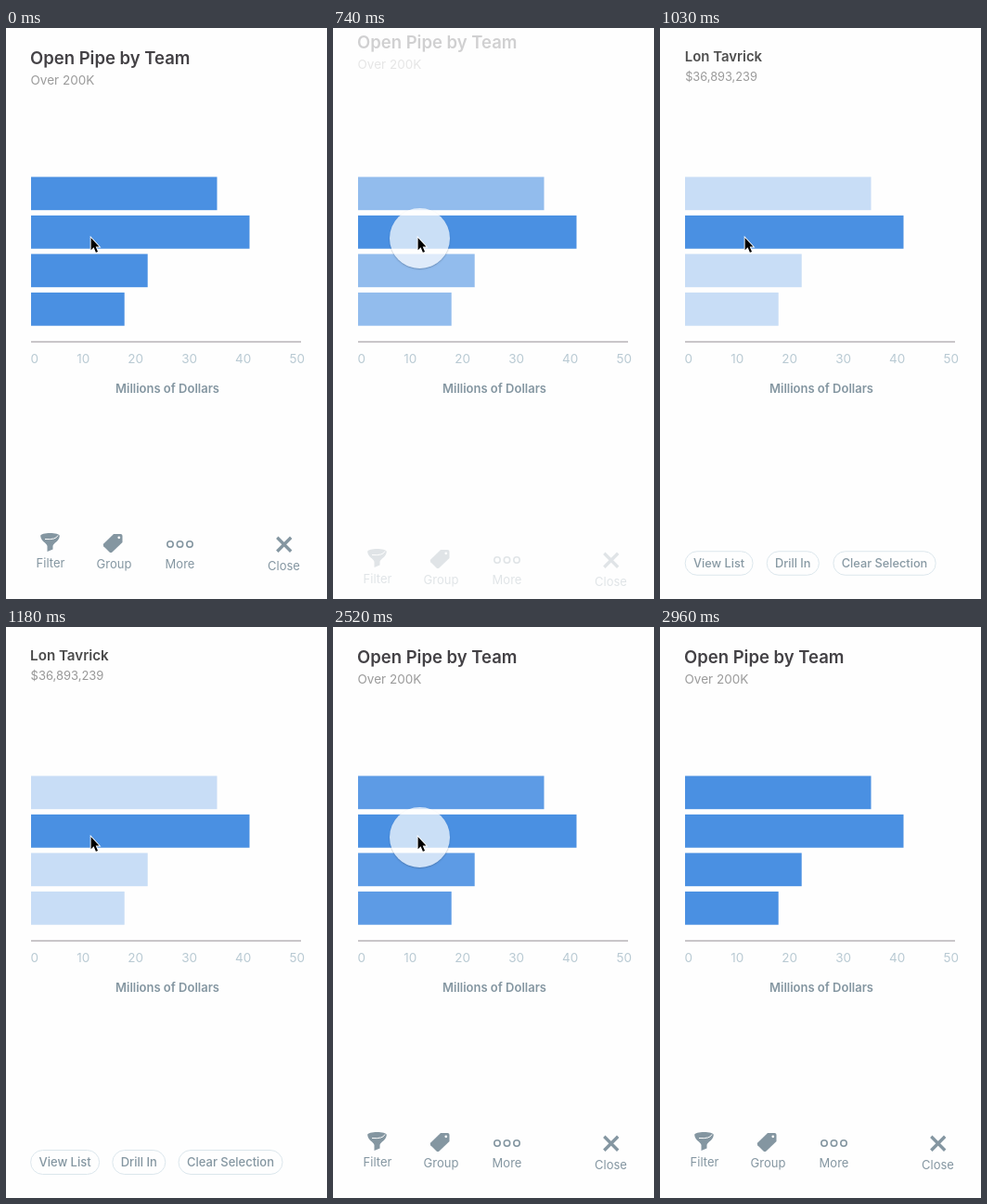
An HTML page that plays this animation: 346x615 px, repeating every 4.41 s.

```html
<!DOCTYPE html>
<html lang="en">
<head>
<meta charset="utf-8">
<title>Bar chart selection</title>
<style>
  html, body { margin: 0; width: 100%; height: 100%; overflow: hidden; background: #fefefe; }
  svg, div { position: absolute; left: 0; top: 0; display: block; }
  text, #ticks { font: 400 13px Inter, "Open Sans", sans-serif; fill: #8496a1; }
  .mid { text-anchor: middle; }
  .title { font-size: 18.5px; font-weight: 600; fill: #434145; }
  .sub { font-size: 13.5px; fill: #9b9b9b; }
  .name { font-size: 15.2px; font-weight: 600; fill: #4a4a4a; }
  .sum { fill: #979797; }
  .unit { font-size: 13px; font-weight: 600; }
  .pill text { font-weight: 500; }
  .pill rect { fill: #fefefe; stroke: #dbe6ec; }
  .pop { transform-box: fill-box; transform-origin: center; }
  .bar { fill: #4a90e2; }
  .icon { fill: #8496a1; }
  .line { fill: none; stroke: #8496a1; }
  #ticks {
    left: 26.5px; top: 348px; width: 295.5px; display: flex; justify-content: space-between;
    font-size: 13.5px; line-height: 16px; color: #b9cad3;
  }
  #touch {
    left: 61px; top: 193.5px; width: 65px; height: 65px;
    border-radius: 50%; background: rgba(255, 255, 255, .71);
    box-shadow: 0 1px 1.5px rgba(40, 60, 90, .35);
  }
</style>
</head>
<body>
<svg width="346" height="615">
  <g id="head">
    <text class="title" x="26" y="39">Open Pipe by Team</text>
    <text class="sub" x="26.5" y="61">Over 200K</text>
  </g>

  <g id="bars"></g>
  <path d="M27 338H318" stroke="#c9c6c9" stroke-width="2"/>
  <text class="unit mid" x="174" y="393">Millions of Dollars</text>

  <g id="tools">
    <path class="icon" d="M37.2 547C37.2 543 57.8 543 57.8 547C57.5 553 51 554.5 50.5 558V561.5L44.5 564V558C44 554.5 37.5 553 37.2 547Z"/>
    <path d="M42 550.5Q54 551.5 56 546.5" fill="none" stroke="#fefefe"/>
    <path class="icon" d="M116 545H123.5Q125.5 545 125.5 547V554L114.5 564.5Q113 565.6 111.5 564.5L105.2 558.2Q104.2 556.8 105.2 555.5Z"/>
    <circle cx="121.8" cy="548.8" r="1.4" fill="#fefefe"/>
    <g id="dots" class="line" stroke-width="1.6"></g>
    <path class="line" stroke-width="3.4" d="M292.3 548.8L307.2 563.7M307.2 548.8L292.3 563.7"/>
    <text class="mid" x="48" y="581">Filter</text>
    <text class="mid" x="116.5" y="582">Group</text>
    <text class="mid" x="187.5" y="582">More</text>
    <text class="mid" x="299.5" y="583.5">Close</text>
  </g>

  <g id="detail">
    <text class="name pop" x="26" y="36.5">Lon Tavrick</text>
    <text class="sum pop" x="26.5" y="57">$36,893,239</text>
  </g>
</svg>
<div id="ticks"></div>
<div id="touch"></div>
<svg id="cursor" width="346" height="615">
  <path d="M91.6 226V239.2L94.6 236.3L96.9 241.8L99 240.9L96.7 235.6H100.4Z" stroke="#fff" stroke-width="1.8" paint-order="stroke"/>
</svg>

<script>
const LOOP = 4410, FRAME = 148.15;
const SELECT = 4, CLEAR = 16, LEAVE = 20; // in frames
const $ = id => document.getElementById(id);

function add(parent, tag, attrs, text = "") {
  const el = document.createElementNS("http://www.w3.org/2000/svg", tag);
  for (const key in attrs) el.setAttribute(key, attrs[key]);
  el.textContent = text;
  return parent.appendChild(el);
}

const bars = [200.5, 235.5, 125.7, 100.7].map((width, i) =>
  add($("bars"), "rect", { class: "bar", x: 27, y: 160.4 + i * 41.5, width, height: 35.8 }));

for (let i = 0; i <= 5; i++) {
  const tick = document.createElement("span");
  tick.textContent = i * 10;
  $("ticks").append(tick);
}

for (let i = -1; i <= 1; i++) add($("dots"), "circle", { cx: 187.5 + i * 10.5, cy: 556, r: 3.2 });

// Pills sit in a row, each as wide as its label plus padding.
let left = 26.5;
for (const label of ["View List", "Drill In", "Clear Selection"]) {
  const pill = add($("detail"), "g", { class: "pill pop" });
  const box = add(pill, "rect", { x: left, y: 563.5, height: 26, rx: 13 });
  const text = add(pill, "text", { x: left + 9, y: 581.3 }, label);
  const width = text.getComputedTextLength() + 18;
  box.setAttribute("width", width);
  left += width + 14;
}
const pops = document.querySelectorAll(".pop");

const ramp = (n, from, length = 1) => Math.min(1, Math.max(0, (n - from) / length));
const smooth = x => x * x * (3 - 2 * x);
const within = (n, from, to) => n >= from && n < to ? 1 : 0;

function draw(t) {
  // Motion is held for one frame at a time, on a 10 ms clock.
  const n = Math.floor((t - t % 10 + 7.5) / FRAME);

  const menu = 1 - ramp(n, SELECT + .24) + ramp(n, CLEAR - .24);
  const shift = (1 - menu) * 22.4;
  const picked = smooth(ramp(n, SELECT, 1.8)) - smooth(ramp(n, CLEAR - .36, 1.8));
  const detail = within(n, SELECT + 2, CLEAR) * (1 - .17 ** (n - SELECT - 1));

  $("head").style.opacity = $("tools").style.opacity = menu;
  $("head").setAttribute("transform", `translate(0 ${-shift})`);
  $("tools").setAttribute("transform", `translate(0 ${shift})`);
  $("detail").style.opacity = detail;
  pops.forEach(el => el.style.transform = `scale(${.4 + .6 * detail})`);
  bars.forEach((bar, i) => bar.style.opacity = i === 1 ? 1 : 1 - .7 * picked);
  $("touch").style.opacity = within(n, SELECT, SELECT + 3) + within(n, CLEAR, CLEAR + 3);
  $("cursor").style.opacity = within(n, 0, LEAVE);
}

const start = performance.now();
function tick() {
  draw((performance.now() - start) % LOOP);
  requestAnimationFrame(tick);
}
tick();
</script>
</body>
</html>
```
